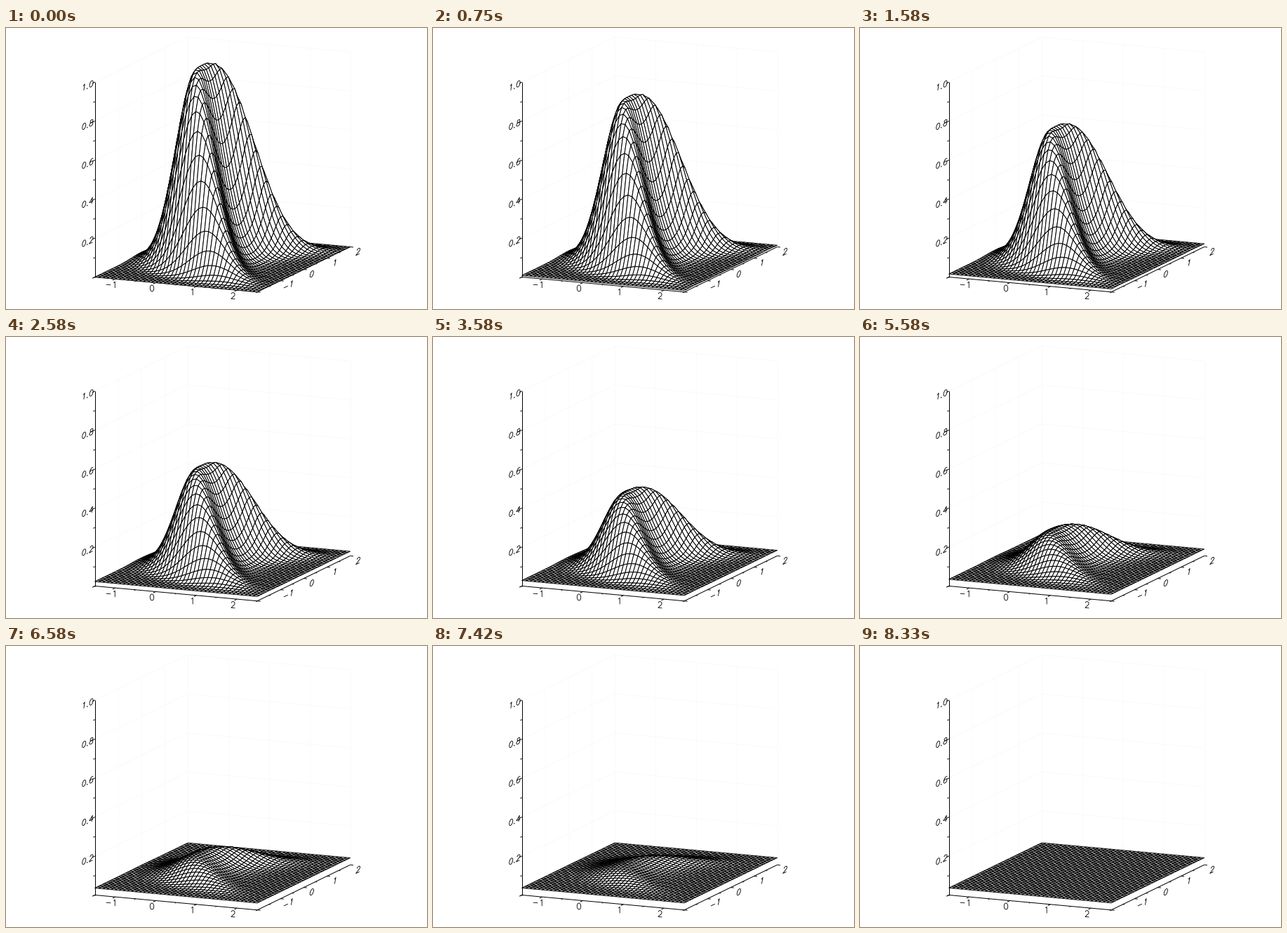
These frames come from a looping animation (600x400 px, 8410 ms). A matplotlib script:

```python
import numpy as np
import matplotlib.pyplot as plt
from matplotlib.animation import FuncAnimation
from matplotlib.collections import LineCollection, PolyCollection

W, H, DPI = 600, 400, 100
STEPS, LOOP_MS = 101, 8410
TICKS = 3  # drawn frames per step of the motion
PX = 72 / DPI  # one pixel in points

# Parallel projection: screen vectors per unit of x, y, z
ORIGIN = np.array([126.7, 354.5])
EX = np.array([57.85, 5.32])
EY = np.array([33.1, -16.05])
EZ = np.array([0, -277.5])
X0, X1, Y0, Y1 = -1.5, 2.5, -2, 2

CELLS = 40
DECAY = 1.6
FLOOR = 0.0365


def project(x, y, z):
    x, y, z = (np.asarray(v, float)[..., None] for v in (x, y, z))
    return ORIGIN + (x - X0) * EX + (y - Y0) * EY + z * EZ


def line3d(p, q):
    return np.array([project(*p), project(*q)])


def arc(cx, cy, rx, ry, start=0, end=360):
    a = np.radians(np.linspace(start, end, 25))
    return np.column_stack([cx + rx * np.cos(a), cy + ry * np.sin(a)])


# Stroke glyphs of unit height: (advance, strokes)
GLYPHS = {
    "0": (0.95, [arc(0.48, 0.5, 0.33, 0.5)]),
    "1": (0.95, [[(0.28, 0.8), (0.38, 0.86), (0.52, 1), (0.52, 0)]]),
    "2": (0.95, [np.vstack([arc(0.47, 0.71, 0.29, 0.29, 170, -40),
                            [(0.14, 0), (0.81, 0)]])]),
    "4": (0.95, [[(0.62, 0), (0.62, 1), (0.14, 0.33), (0.86, 0.33)]]),
    "6": (0.95, [arc(0.5, 0.31, 0.31, 0.31),
                 arc(0.56, 0.42, 0.37, 0.58, 55, 185)]),
    "8": (0.95, [arc(0.48, 0.77, 0.26, 0.23), arc(0.48, 0.27, 0.33, 0.27)]),
    ".": (0.46, [arc(0.23, 0.04, 0.04, 0.04)]),
    "-": (1.15, [[(0.15, 0.43), (0.95, 0.43)]]),
}


def label(text, center, right, up, size=9):
    """Strokes of a text centred on a point, in a skewed frame."""
    right, up = size * np.array(right), size * np.array(up)
    pen = -sum(GLYPHS[c][0] for c in text) / 2
    strokes = []
    for c in text:
        advance, parts = GLYPHS[c]
        for part in parts:
            p = np.asarray(part, float)
            strokes.append(center + (p[:, :1] + pen) * right
                           + (p[:, 1:] - 0.5) * up)
        pen += advance
    return strokes


def wall_grid():
    lines = []
    for z in np.linspace(0, 1, 6):
        lines.append(line3d((X0, Y0, z), (X0, Y1, z)))
        lines.append(line3d((X0, Y1, z), (X1, Y1, z)))
    for s in range(5):
        lines.append(line3d((X0, Y0 + s, 0), (X0, Y0 + s, 1)))
        lines.append(line3d((X0 + s, Y1, 0), (X0 + s, Y1, 1)))
    return lines


def axes_lines():
    lines = [line3d((X0, Y0, 0), (X0, Y0, 1)),
             line3d((X0, Y0, 0), (X1, Y0, 0)),
             line3d((X1, Y0, 0), (X1, Y1, 0))]
    x_dir, y_dir = EX / np.hypot(*EX), EY / np.hypot(*EY)

    def tick(p, step):
        lines.append(np.array([p, p + step]))

    for x in np.arange(X0, X1 + 0.1, 0.5):
        tick(project(x, Y0, 0), -y_dir * (4 if x % 1 == 0 else 2))
    for y in np.arange(Y0, Y1 + 0.1, 0.5):
        tick(project(X1, y, 0), x_dir * (4.5 if y % 1 == 0 else 2.5))
    for k in range(11):
        tick(project(X0, Y0, k / 10), -y_dir * (2.5 if k % 2 else 4))
    return lines


def axis_labels():
    strokes = []
    rising = (0.82, -0.38)
    for x in (-1, 0, 1, 2):
        center = project(x, Y0, 0) + (-5.5, 8)
        strokes += label(str(x), center, (0.92, 0.08), (0, -1))
    for y in (-1, 0, 1, 2):
        center = project(X1, y, 0) + (11.5, 6.5)
        strokes += label(str(y), center, rising, (0.2, -1))
    for k in (2, 4, 6, 8, 10):
        center = project(X0, Y0, k / 10) + (-10.3, 5)
        strokes += label(f"{k / 10:.1f}", center, rising, (0.15, -1))
    return strokes


# Rows run from the back to the front so that near cells hide far ones
gx, gy = np.meshgrid(np.linspace(X0, X1, CELLS + 1),
                     np.linspace(Y1, Y0, CELLS + 1))
bump = np.exp(-gx**2 - (gx - gy**2) ** 2)


def cells(step):
    t = step / (STEPS - 1)
    scale = (np.exp(-DECAY * t) - np.exp(-DECAY)) / (1 - np.exp(-DECAY))
    rise = FLOOR * (1 - (1 - t) ** 2.7)
    p = project(gx, gy, scale * bump + rise)
    quads = np.stack([p[:-1, :-1], p[:-1, 1:], p[1:, 1:], p[1:, :-1]], axis=2)
    return quads.reshape(-1, 4, 2)


fig = plt.figure(figsize=(W / DPI, H / DPI), dpi=DPI, facecolor="white")
ax = fig.add_axes([0, 0, 1, 1])
ax.set(xlim=(0, W), ylim=(H, 0))
ax.axis("off")

ax.add_collection(LineCollection(wall_grid(), colors="#fafafa",
                                 linewidths=PX, zorder=1))
ax.add_collection(LineCollection(axes_lines(), colors="black",
                                 linewidths=PX, zorder=2))
ax.add_collection(LineCollection(axis_labels(), colors="black",
                                 linewidths=0.85 * PX, zorder=2))
surface = PolyCollection(cells(0), facecolors="white", edgecolors="black",
                         linewidths=PX, joinstyle="round", zorder=3)
ax.add_collection(surface)


def update(i):
    # Each step is held for a few ticks and turns over one tick early
    surface.set_verts(cells((i + 1) // TICKS % STEPS))
    return [surface]


anim = FuncAnimation(fig, update, frames=STEPS * TICKS,
                     interval=LOOP_MS / (STEPS * TICKS),
                     repeat=True, repeat_delay=0)
plt.show()
```
